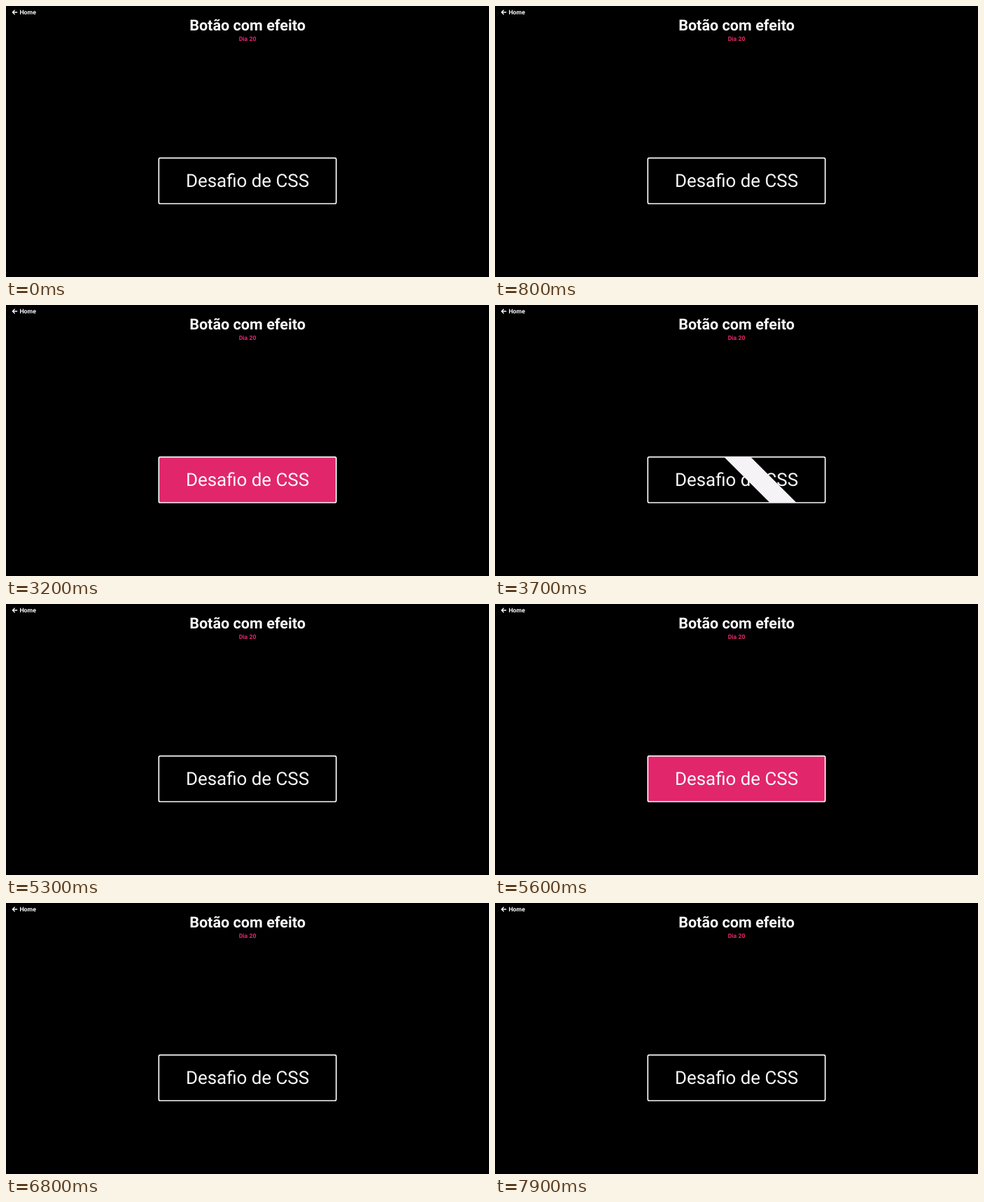
An HTML page for the animation above (8 s loop, 690 px wide and 388 px high).

```html
<!DOCTYPE html>
<html lang="pt">
<head>
<meta charset="utf-8">
<title>Botão com efeito</title>
<style>
  html, body { margin: 0; width: 100%; height: 100%; overflow: hidden; background: #000; }
  svg { display: block; width: 100vw; height: 100vh; }
  text { font-family: Roboto, sans-serif; fill: #fbf9fb; text-rendering: geometricPrecision; }
  .bold { font-weight: 700; }
  .center { text-anchor: middle; }
  .day { fill: #e2266c; }
</style>
</head>
<body>
<svg viewBox="0 0 690 388">
  <clipPath id="inside"><rect x="218.5" y="217.8" width="253" height="65" rx="2"/></clipPath>

  <path d="M16.2 9H9.6M12.6 5.8L9.4 9l3.2 3.2" fill="none" stroke="#fbf9fb" stroke-width="1.3"/>
  <text class="bold" x="19.4" y="12.4" font-size="8.8">Home</text>
  <text class="bold center" x="345" y="35.2" font-size="21.6">Botão com efeito</text>
  <text class="bold center day" x="345" y="50.3" font-size="8.7">Dia 20</text>

  <rect id="fill" x="218.3" y="217.6" width="253.4" height="65.4" rx="2"/>
  <text class="center" x="345" y="259.1" font-size="25.9">Desafio de CSS</text>
  <g clip-path="url(#inside)">
    <path id="stripe" d="M-52 217.5h38l66 66h-38z" fill="#f5f3f5"/>
  </g>
  <rect x="218.3" y="217.6" width="253.4" height="65.4" rx="2" fill="none" stroke="#fbf9fb" stroke-width="1.7"/>
</svg>
<script>
const LOOP = 8000, STEP = 100, DURATION = 350;
const STRIPE_START = 120, STRIPE_END = 570;
const hovers = [[2219, 3610], [5330, 6350]];
const fill = document.getElementById('fill');
const stripe = document.getElementById('stripe');

// CSS "ease": cubic-bezier(.25, .1, .25, 1), solved by bisection.
function ease(x) {
  if (x <= 0) return 0;
  if (x >= 1) return 1;
  const curve = (a, b, u) => 3 * a * u * (1 - u) ** 2 + 3 * b * u * u * (1 - u) + u ** 3;
  let low = 0, high = 1;
  for (let i = 0; i < 24; i++) {
    const mid = (low + high) / 2;
    if (curve(.25, .25, mid) < x) low = mid; else high = mid;
  }
  return curve(.1, 1, low);
}

function draw(now) {
  const t = Math.floor(now % LOOP / STEP) * STEP;
  const progress = start => ease((t - start) / DURATION);
  const hovered = hovers.some(([on, off]) => t >= on && t < off);
  const position = hovers.reduce((sum, [on, off]) => sum + progress(on) - progress(off), 0);
  const x = STRIPE_START + (STRIPE_END - STRIPE_START) * position;
  fill.setAttribute('fill', hovered ? '#e2266c' : '#000');
  stripe.setAttribute('transform', `translate(${x})`);
}

const began = performance.now();
function tick() {
  draw(performance.now() - began);
  requestAnimationFrame(tick);
}
tick();
</script>
</body>
</html>
```
